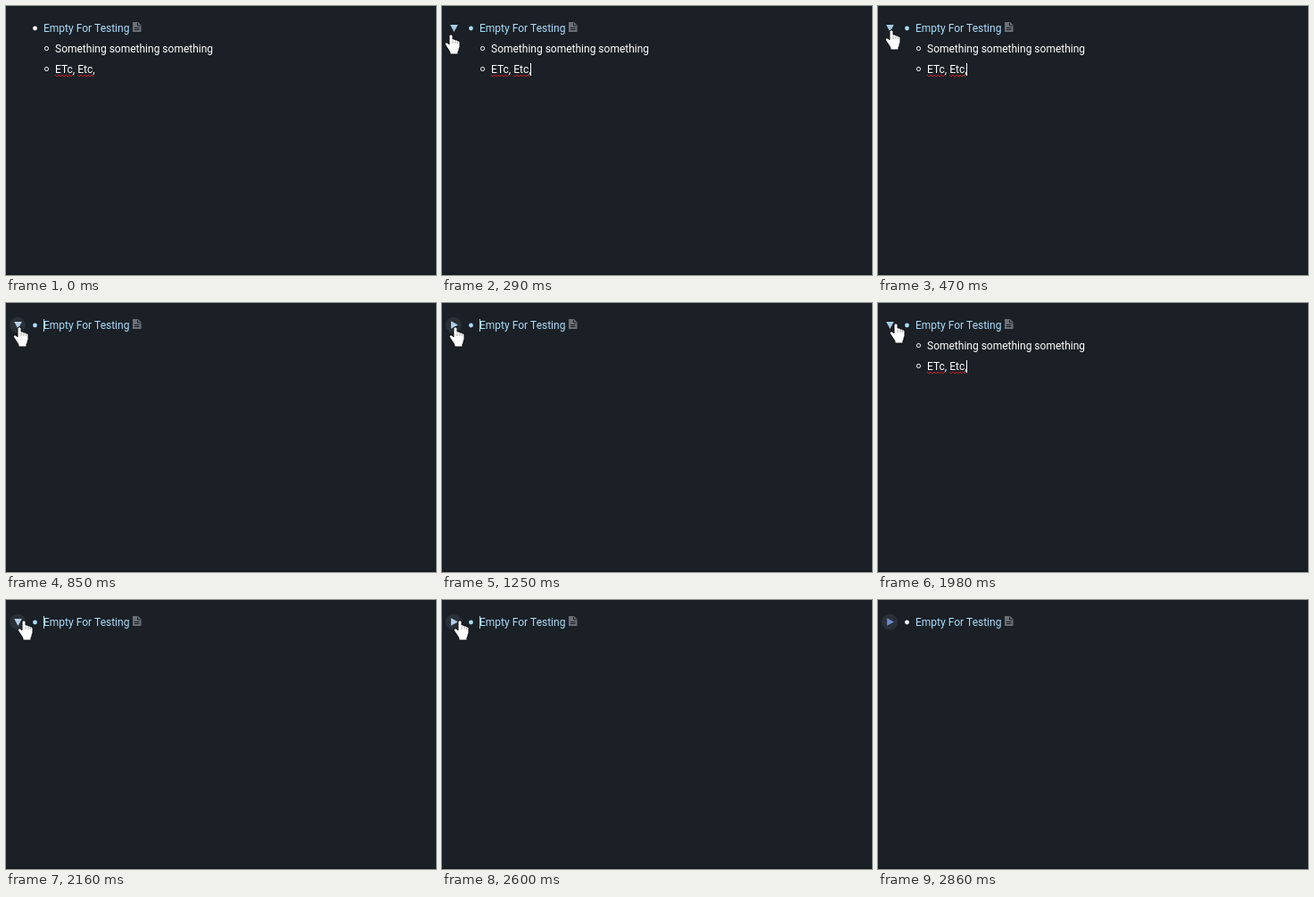
Write an HTML page with a canvas that moves like this. It is 482 px wide and 301 px high and loops after 2950 ms.

```html
<!DOCTYPE html>
<html lang="en">
<head>
<meta charset="utf-8">
<title>Collapsing list</title>
<style>
html, body { margin: 0; width: 100%; height: 100%; overflow: hidden; background: #1a2026; }
canvas { display: block; width: 482px; height: 301px; }
</style>
</head>
<body>
<canvas id="stage" width="482" height="301"></canvas>
<script>
const ctx = document.getElementById('stage').getContext('2d', { alpha: false });
const LOOP = 2950;
const BG = '#1a2026', LINK = '#aadcfa', WHITE = '#ffffff';

const clamp = v => Math.min(1, Math.max(0, v));
const lerp = (a, b, u) => a + (b - a) * u;
const progress = (t, from, to) => clamp((t - from) / (to - from));
const smooth = u => u * u * (3 - 2 * u);
const easeOut = u => 1 - (1 - u) * (1 - u);
const between = (t, a, b) => t >= a && t < b;

// Pointer moves: start, end, from, to, easing
const moves = [
  [70, 470, [-12, 50], [14.5, 27], easeOut],
  [1500, 1750, [14.5, 27], [467, 164], smooth],
  [1750, 1980, [467, 164], [19.5, 23], smooth],
  [2600, 2860, [19.5, 23], [492, 291], smooth]
];

function pointerAt(t) {
  let pos = null;
  for (const [start, end, a, b, ease] of moves) {
    if (t < start) break;
    const u = ease(progress(t, start, end));
    pos = { x: lerp(a[0], b[0], u), y: lerp(a[1], b[1], u) };
  }
  return pos && pos.x < 490 ? pos : null;
}

function shape(points, fill) {
  ctx.beginPath();
  points.forEach(([x, y]) => ctx.lineTo(x, y));
  ctx.closePath();
  ctx.fillStyle = fill;
  ctx.fill();
}

function line(points, color, width = 1) {
  ctx.beginPath();
  points.forEach(([x, y]) => ctx.lineTo(x, y));
  ctx.strokeStyle = color;
  ctx.lineWidth = width;
  ctx.stroke();
}

function disc(x, y, r, color) {
  ctx.beginPath();
  ctx.arc(x, y, r, 0, Math.PI * 2);
  ctx.fillStyle = color;
  ctx.fill();
}

function label(text, x, y, color) {
  ctx.font = '400 12px Roboto, sans-serif';
  ctx.textBaseline = 'alphabetic';
  ctx.fillStyle = color;
  ctx.fillText(text, x, y);
}

function rect(x, y, w, h, color) {
  ctx.fillStyle = color;
  ctx.fillRect(x, y, w, h);
}

function squiggle(from, to, y) {
  const points = [];
  for (let x = from, i = 0; x <= to; x += 2, i++) points.push([x, y + (i % 2 ? 1 : -1)]);
  line(points, '#c8202c');
}

function pageIcon(x, y) {
  const gray = '#6b7076';
  shape([[x, y], [x + 6, y], [x + 9.5, y + 3.5], [x + 9.5, y + 11], [x, y + 11]], gray);
  line([[x + 5.5, y + 0.8], [x + 5.5, y + 4], [x + 8.8, y + 4]], BG);
  line([[x + 2, y + 6.5], [x + 7.5, y + 6.5]], BG);
  line([[x + 2, y + 8.5], [x + 7.5, y + 8.5]], BG);
}

function child(text, y) {
  ctx.beginPath();
  ctx.arc(45.5, y - 4.5, 2.1, 0, Math.PI * 2);
  ctx.strokeStyle = WHITE;
  ctx.lineWidth = 1;
  ctx.stroke();
  label(text, 55, y, WHITE);
}

function arrow(turn, color) {
  ctx.save();
  ctx.translate(13.5, 24.5);
  ctx.rotate(-turn * Math.PI / 2);
  shape([[-4.3, -3.4], [4.3, -3.4], [0, 4.4]], color);
  ctx.restore();
}

const handOutline = [
  [6, 0], [8, 0], [9, 1], [9, 5], [11, 5], [12, 6], [14, 6], [15, 7], [16, 7], [17, 8],
  [17, 14], [16, 16], [16, 18], [15, 19], [15, 22], [6, 22], [6, 20], [5, 18],
  [3, 15], [1, 12], [0, 10], [1, 9], [3, 9], [5, 11], [5, 1]
];

function hand(x, y) {
  ctx.save();
  ctx.translate(Math.round(x - 6.5), Math.round(y));
  shape(handOutline, WHITE);
  line([...handOutline, handOutline[0]], '#0c0f12');
  for (const k of [9, 12, 14.5]) line([[k, 6.5], [k, 10]], 'rgba(12,15,18,0.45)', 0.8);
  ctx.restore();
}

function beam(x, y) {
  x = Math.round(x);
  y = Math.round(y);
  rect(x, y - 7, 1, 15, WHITE);
  for (const dy of [-8, 7]) {
    rect(x - 3, y + dy, 3, 1, WHITE);
    rect(x + 1, y + dy, 3, 1, WHITE);
  }
}

function draw(t) {
  const pointer = pointerAt(t);
  const hover = pointer !== null && pointer.x > -4 && pointer.y < 36;
  const firstFold = between(t, 760, 1340);
  const folded = firstFold || t >= 2070;

  rect(0, 0, 482, 301, BG);
  rect(0, 299, 482, 2, '#171c21');

  if (folded) {
    const start = firstFold ? 760 : 2070;
    const turn = smooth(progress(t, start + 90, firstFold ? 1250 : 2430));
    ctx.globalAlpha = progress(t, start - 30, start + 60);
    disc(13, 24.5, 9, '#2a3037');
    ctx.globalAlpha = 1;
    arrow(turn, hover ? '#b4cfe9' : '#6f88cc');
  } else if (hover) {
    arrow(0, '#a5cbe3');
  }

  disc(32.5, 25, 2.4, hover ? LINK : WHITE);
  label('Empty For Testing', 42, 29, LINK);
  pageIcon(142, 18);

  if (folded) {
    if (t < 2800) rect(42, 18, 1, 14, LINK);
  } else {
    child('Something something something', 52);
    child('ETc, Etc,', 75);
    squiggle(55, 75, 78);
    squiggle(80, 98, 78);
    if (t >= 200) rect(99, 64, 1, 14, WHITE);
  }

  if (pointer) (pointer.x < 30 ? hand : beam)(pointer.x, pointer.y);
}

const began = performance.now();
function frame() {
  draw((performance.now() - began) % LOOP);
  requestAnimationFrame(frame);
}
frame();
</script>
</body>
</html>
```
